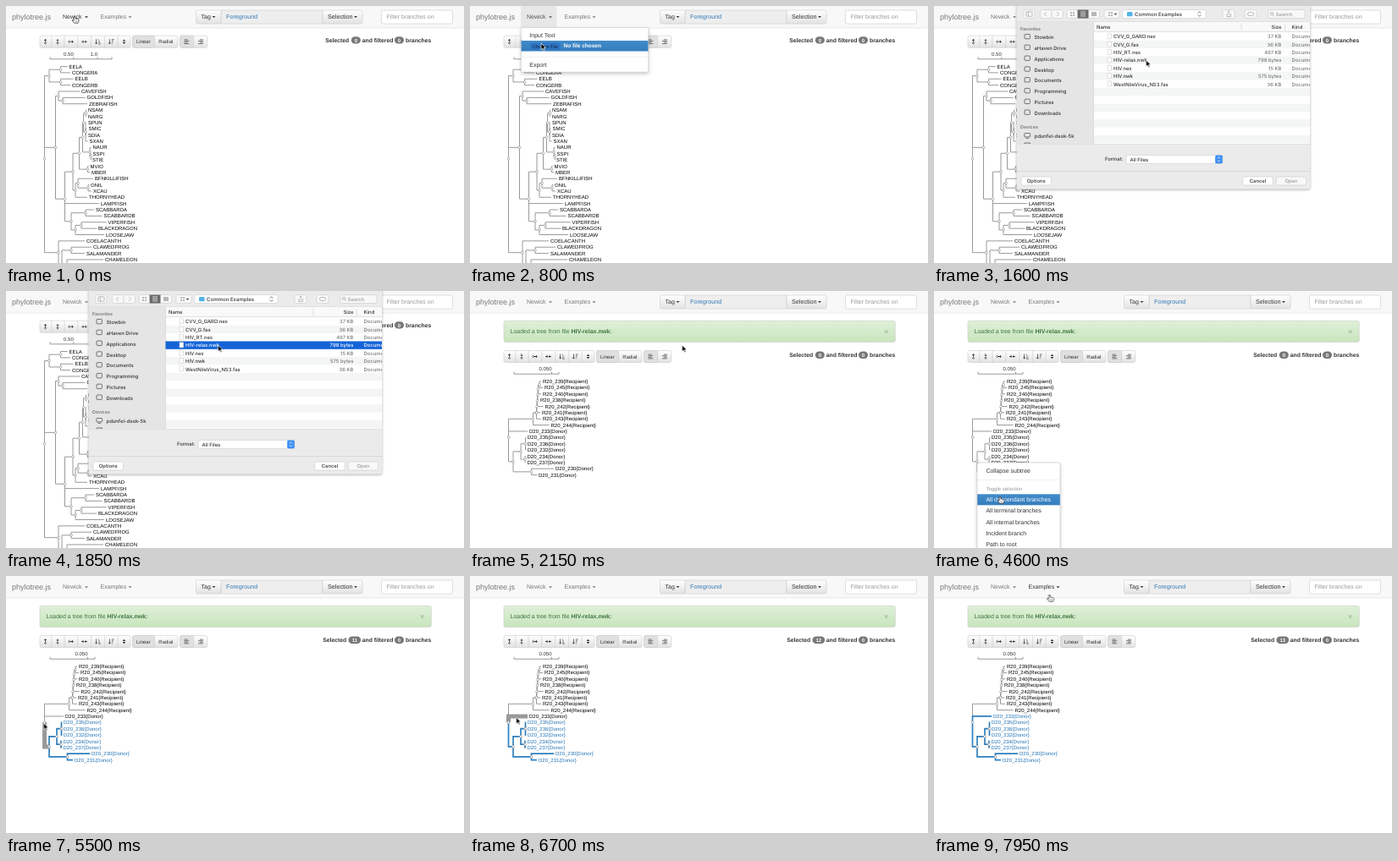
Recreate the animation shown at these times as an HTML page. Size 541 by 304 pixels, loop 8 s.

```html
<!DOCTYPE html>
<html lang="en">
<head>
<meta charset="utf-8">
<title>Tree viewer</title>
<style>
html, body { margin: 0; width: 100%; height: 100%; overflow: hidden; background: #fff; }
svg { display: block; width: 541px; height: 304px; font: 7px "Liberation Sans", Arial, sans-serif; text-rendering: geometricPrecision; fill: #333; }
text { white-space: pre; }
.branch { fill: none; stroke: #999; }
.picked .branch { stroke: #2f7fbd; stroke-width: 1.7; }
.hover .branch { stroke-width: 5; }
.leaf { font-size: 6px; fill: #000; }
.picked .leaf { fill: #2272b4; }
.node { fill: #fff; stroke: #999; stroke-width: .7; }
.small { font-size: 6px; }
.bold { font-weight: bold; }
.count { font-size: 6.8px; font-weight: bold; }
.grey { fill: #777; }
.pale { fill: #999; }
.white { fill: #fff; }
.box { stroke: #ccc; stroke-width: .6; }
.rule { stroke: #e5e5e5; stroke-width: .6; }
.line { fill: none; stroke: #555; stroke-width: .8; }
.faint { fill: none; stroke: #aaa; stroke-width: .8; }
.popup { fill: #fff; stroke: #bbb; stroke-width: .5; filter: drop-shadow(0 2px 2px rgba(0,0,0,.2)); }
.sheet { font: 500 5.9px Inter, "Open Sans", sans-serif; animation: unfold 8s linear infinite; }
.panel { filter: drop-shadow(0 1px 1.5px rgba(0,0,0,.3)); }
.tools { animation: lower 8s step-end infinite; }
.cursor { animation: point 8s ease-in-out infinite; }
@keyframes lower { 0% { transform: none; } 25%, 100% { transform: translateY(35.3px); } }
@keyframes unfold { 0%, 10.1% { transform: translateY(-225px); } 10.6%, 100% { transform: none; } }
@keyframes point {
  0%, 3% { transform: translate(81px, 12px); }
  8.75%, 12% { transform: translate(84px, 44px); }
  18.75%, 32.5% { transform: translate(250.5px, 64px); }
  41.5%, 50% { transform: translate(50px, 201px); }
  56%, 62% { transform: translate(78px, 243px); }
  67.5%, 81% { transform: translate(44.5px, 174px); }
  85%, 89.5% { transform: translate(57px, 165.5px); }
  99%, 100% { transform: translate(136.5px, 22px); }
}
</style>
</head>
<body>
<svg id="stage" viewBox="0 0 541 304">
  <defs>
    <linearGradient id="button" x2="0" y2="1"><stop stop-color="#fff"/><stop offset="1" stop-color="#e2e2e2"/></linearGradient>
    <linearGradient id="success" x2="0" y2="1"><stop stop-color="#dff0d8"/><stop offset="1" stop-color="#c8e5bc"/></linearGradient>
    <linearGradient id="active" x2="0" y2="1"><stop stop-color="#428bca"/><stop offset="1" stop-color="#357ebd"/></linearGradient>
    <clipPath id="list"><path d="M98 0H444V163H98Z"/></clipPath>
  </defs>
</svg>
<script>
const LOOP = 8000, LOADED = 2000, CLADE = 4750, STEM = 6200, TIP = 7000;
const rules = [];

// Markup shown only from one moment to another.
function during(from, to, markup, cls = '') {
  const name = 'span' + rules.length, at = t => t / LOOP * 100 + '%';
  rules.push(`@keyframes ${name} {
    0% { visibility: ${from ? 'hidden' : 'visible'}; }
    ${at(from)} { visibility: visible; }
    ${at(to)}, 100% { visibility: hidden; } }`);
  return `<g class="${cls}" style="animation: ${name} 8s step-end infinite">${markup}</g>`;
}
// A sheet needs its own transform animation next to the visibility one.
const group = (markup, cls = '', more = '') => `<g class="${cls}" ${more}>${markup}</g>`;
const text = (x, y, s, cls = '', more = '') => `<text x="${x}" y="${y}" class="${cls}" ${more}>${s}</text>`;
const rect = (x, y, w, h, fill, r = 0, cls = '') =>
  `<rect x="${x}" y="${y}" width="${w}" height="${h}" rx="${r}" fill="${fill}" class="${cls}"/>`;
const path = (d, cls = '', more = '') => `<path d="${d}" class="${cls}" ${more}/>`;
const caret = (x, y, fill = '#777') => path(`M${x} ${y}h4l-2 2.1z`, '', `fill="${fill}"`);
const END = 'text-anchor="end"', MID = 'text-anchor="middle"';

// Trees: [x, ...children] for a node, "NAME:x" for a leaf.
function layout(tree, top) {
  let row = 0;
  const place = item => {
    if (typeof item === 'string') {
      const [name, x] = item.split(':');
      return { name, x: x - 2, y: top + 7.37 * row++, kids: [] };
    }
    const kids = item.slice(1).map(place);
    return { x: item[0], y: kids.reduce((sum, k) => sum + k.y, 0) / kids.length, kids };
  };
  return place(tree);
}
const edge = (p, n) => path(`M${p.x} ${p.y}V${n.y}H${n.x}`, 'branch');
const branch = (p, n) => edge(p, n) + (n.name ? text(n.x + 2, n.y + 2.1, n.name, 'leaf') : '');
const subtree = n => n.kids.map(k => branch(n, k) + subtree(k)).join('');
const dots = n => n.kids.length
  ? `<circle cx="${n.x}" cy="${n.y}" r="1.4" class="node"/>` + n.kids.map(dots).join('') : '';
const pickedAt = (t, markup) => during(LOADED, t, markup) + during(t, LOOP, markup, 'picked');

const fishes = layout([45.5,
  [51, [64.5, 'EELA:74.5', 'CONGERA:78'], [64.5, 'EELB:81.5', 'CONGERB:78']],
  [58.5,
    [62, 'CAVEFISH:89', [67, 'GOLDFISH:95.5', 'ZEBRAFISH:98']],
    [69.5,
      [79,
        [86.5,
          [90.5,
            [91.5, [94.5, 'NSAM:97', 'NARG:97'],
              [94, 'SPUN:97', 'SMIC:97.5', 'SDIA:97', 'SXAN:98.5']],
            [99, 'NAUR:102.5', [100.3, 'SSPI:102.5', 'STIE:102']]],
          [96.5, 'MVIO:99.5', 'MBER:101']],
        [82, [85, 'BFNKILLIFISH:105', [97, 'ONIL:100', 'XCAU:103']], 'THORNYHEAD:98']],
      'LAMPFISH:112',
      [77, [94, 'SCABBARDA:106', 'SCABBARDB:115.5'],
        [82, [89, 'VIPERFISH:120.5', 'BLACKDRAGON:109'], 'LOOSEJAW:118']]]],
  [62, 'COELACANTH:95',
    [66, [77, 'CLAWEDFROG:103', 'SALAMANDER:95'],
      [72, 'CHAMELEON:117', [80, ...Array(11).fill(':90')]]]]], 71.5);

const virus = layout([45.5,
  [74.5,
    [78, [78.5, [79, [79.5, [80, [80.5, [82, 'R20_239{Recipient}:86', 'R20_245{Recipient}:88'],
      'R20_240{Recipient}:86'], 'R20_238{Recipient}:83'], 'R20_242{Recipient}:88.5'],
      'R20_241{Recipient}:85'], 'R20_243{Recipient}:86']],
    'R20_244{Recipient}:95.5'],
  'D20_233{Donor}:70',
  [51,
    [60, [65.5, 'D20_235{Donor}:68', 'D20_236{Donor}:68', 'D20_232{Donor}:68'],
      [65, 'D20_234{Donor}:67.5', 'D20_237{Donor}:67.5']],
    [72.5, 'D20_230{Donor}:101', 'D20_231{Donor}:81']]], 107);

function axis(y, right, ticks) {
  const marks = ticks.map(([x]) => `M${x} ${y}v-2.5`).join('');
  return path(`M52 ${y - 2.5}V${y}H${right}v-2.5${marks}`, 'branch') +
    ticks.map(([x, s]) => text(x, y - 3.8, s, 'small', END)).join('');
}

function virusView() {
  const [recipients, tip, stem] = virus.kids;
  const hover = (p, n, from, click, to) =>
    during(from, click, edge(p, n), 'hover') + during(click, to, edge(p, n), 'picked hover');
  return during(LOADED, LOOP,
      rect(40, 35.2, 462.3, 25.2, 'url(#success)', 2, 'box') +
      text(47.5, 50.2, 'Loaded a tree from file <tspan class="bold">HIV-relax.nwk:</tspan>', '', 'fill="#3c763d"') +
      text(489, 50.6, '×', 'bold', 'font-size="9" fill="#a6c19d"') +
      axis(98.2, 105, [[96.5, '0.050']]) + branch(virus, recipients) + subtree(recipients)) +
    pickedAt(CLADE, subtree(stem)) +
    pickedAt(TIP, branch(virus, tip)) +
    pickedAt(STEM, branch(virus, stem)) +
    hover(virus, stem, 5380, STEM, 6560) +
    hover(virus, tip, 6680, TIP, 7260) +
    during(LOADED, LOOP, dots(virus));
}

function navbar() {
  const item = (x, s, cx, fill) => text(x, 15.4, s, '', `fill="${fill}"`) + caret(cx, 12.2, fill);
  const newick = fill => item(67, 'Newick', 93, fill), examples = fill => item(111.5, 'Examples', 144.5, fill);
  return rect(0, 0, 541, 26, '#f8f8f8') + path('M0 26H541', '', 'stroke="#e3e3e3" stroke-width=".8"') +
    text(7, 16, 'phylotree.js', 'grey', 'font-size="9"') +
    during(0, 200, newick('#333')) +
    during(200, 880, rect(60, 0, 42.3, 25.6, '#e7e7e7') + newick('#555')) +
    during(880, LOOP, newick('#777')) +
    during(0, 7800, examples('#777')) + during(7800, LOOP, examples('#333')) +
    rect(254, 5, 120, 16, '#eee', 0, 'box') + text(260, 15.1, 'Foreground', '', 'font-size="7.2" fill="#337ab7"') +
    rect(224.5, 5, 29.5, 16, 'url(#button)', 2, 'box') + text(230.5, 15.1, 'Tag') + caret(243.5, 12, '#333') +
    rect(374, 5, 47, 16, 'url(#button)', 2, 'box') + text(380, 15.1, 'Selection', '', 'font-size="7.2"') + caret(411, 12, '#333') +
    rect(443.5, 5, 84, 16, '#fff', 2, 'box') + text(449.5, 15.2, 'Filter branches on', 'pale');
}

function toolbar() {
  const up = 'M-1.8-1.4L0-3.3 1.8-1.4z', down = 'M-1.8 1.4L0 3.3 1.8 1.4z';
  const apart = path('M-.4-2.5H.4V2.5H-.4z' + up + down);
  const together = path('M-.4-3.3H.4V-1.8H1.7L0-.2-1.7-1.8H-.4zM-.4 3.3H.4V1.8H1.7L0 .2-1.7 1.8H-.4z');
  const turned = m => group(m, '', 'transform="rotate(90)"');
  const sort = flip => path('M-2.2-3H-1.5V1.3H-.3L-1.85 3-3.4 1.3H-2.2z') +
    path([0, 1, 2, 3].map(i => `M.6 ${-2.6 + i * 1.75}h${(flip ? 3 - i : i) * .65 + .8}`).join(''), 'line');
  const icons = [apart, together, turned(apart), turned(together), sort(false), sort(true),
    path('M-1.9-.6L0-2.8 1.9-.6zM-1.9.6L0 2.8 1.9.6z')];
  const bars = right => path([0, 1, 2, 3].map(i =>
    `M${right ? 3 : -3} ${-2.4 + i * 1.6}h${(right ? -1 : 1) * (i % 2 ? 5.8 : 4)}`).join(''), 'line');
  const at = (x, m) => group(m, '', `transform="translate(${x} 42.2)"`);
  const badge = (x, n) => rect(x, 36.2, n > 9 ? 14.6 : 11, 8.4, '#777', 4.2) +
    text(x + (n > 9 ? 7.3 : 5.5), 42.6, n, 'bold small white', MID);
  const selected = n => text(n ? 374.2 : 377.3, 42.6, 'Selected', 'count') + badge(n ? 404.5 : 407.8, n);
  return rect(40, 35.2, 107, 14, 'url(#button)', 2, 'box') +
    path([53.8, 69, 84.7, 100.6, 116.4, 132].map(x => `M${x} 35.2v14`).join(''), 'box') +
    icons.map((icon, i) => at([46.5, 61, 76.5, 92.5, 108.5, 124.2, 139.5][i], icon)).join('') +
    rect(149.5, 35.2, 53.5, 14, 'url(#button)', 2, 'box') + rect(149.5, 35.2, 26, 14, '#e0e0e0', 2, 'box') +
    text(154, 44.4, 'Linear', 'small') + text(180.3, 44.4, 'Radial', 'small') +
    rect(205.5, 35.2, 32.3, 14, 'url(#button)', 2, 'box') + rect(205.5, 35.2, 16.2, 14, '#e0e0e0', 2, 'box') +
    at(213.5, bars(false)) + at(229.8, bars(true)) +
    during(0, CLADE, selected(0)) + during(CLADE, STEM, selected(11)) +
    during(STEM, TIP, selected(12)) + during(TIP, LOOP, selected(13)) +
    text(420.8, 42.6, 'and filtered', 'count') + badge(459, 0) + text(502.3, 42.6, 'branches', 'count', END);
}

function newickMenu() {
  const chooser = fill => rect(71, 43.6, 35.5, 8, fill, 1.5) + text(74, 49.8, 'Choose File', '', 'font-size="5.6" fill="#0d2740"');
  const status = cls => text(110.5, 48.8, 'No file chosen', cls);
  return during(200, 880, rect(60.3, 25.6, 150.5, 52.6, '#fff', 1, 'popup') +
      text(70.3, 37, 'Input Text') + text(70.3, 72, 'Export') + path('M60.5 60.3H210.5', 'rule')) +
    during(200, 600, chooser('#eee') + status('')) +
    during(600, 880, rect(60.5, 41, 150, 12.5, 'url(#active)') + chooser('#2f74c4') +
      group(status('white bold'), '', 'font-size="6.5"'));
}

function nodeMenu() {
  const x = 51, y = 203, left = x + 10.4;
  const option = (s, dy) => text(left, y + dy, s);
  return during(3900, CLADE, rect(x, y, 98, 150, '#fff', 2, 'popup') +
      option('Collapse subtree', 12) + path(`M${x} ${y + 20.3}h98`, 'rule') +
      text(left, y + 33, 'Toggle selection', 'small pale') + option('All descendant branches', 46) +
      ['All terminal branches', 'All internal branches', 'Incident branch', 'Path to root']
        .map((s, i) => option(s, 59.3 + i * 13.3)).join('')) +
    during(4420, CLADE, rect(x + .2, y + 37.3, 97.6, 13, 'url(#active)') + text(left, y + 46, 'All descendant branches', 'white'));
}

function fileSheet() {
  const files = [['CVV_G_GARD.nex', '37 KB'], ['CVV_G.fas', '36 KB'], ['HIV_RT.nex', '497 KB'],
    ['HIV-relax.nwk', '798 bytes'], ['HIV.nex', '15 KB'], ['HIV.nwk', '575 bytes'], ['WestNileVirus_NS3.fas', '36 KB']];
  const places = ['Stowbin', 'aHaven Drive', 'Applications', 'Desktop', 'Documents', 'Programming', 'Pictures', 'Downloads'];
  const rowY = i => 31.4 + i * 9.35;
  const entry = ([name, size], i, cls = '', dim = 'grey') => {
    const y = rowY(i) + 7;
    return rect(205, y - 5.6, 4.6, 6, '#fff', 0, 'box') + text(212, y, name, cls) +
      text(410.5, y, size, dim, END) + text(422.5, y, 'Document', dim);
  };
  const place = (s, i) => rect(107, 33.4 + i * 12.8, 6.4, 5.4, 'none', 1, 'line') + text(118.5, 39.2 + i * 12.8, s);
  const button = (x, y, w, h) => rect(x, y, w, h, '#f8f8f8', 2, 'box');
  const white = (x, y, w, h) => rect(x, y, w, h, '#fff', 2, 'box');
  const chevrons = (x, y) => path(`M${x - 1.7} ${y - 1}l1.7-1.8 1.7 1.8m0 2l-1.7 1.8-1.7-1.8`, 'line');
  const toolbarIcons =
    rect(109, 6.8, 7, 5.4, 'none', .5, 'faint') +
    path('M111.3 7v5M132.8 7l-2.5 2.5 2.5 2.5M145.2 7l2.5 2.5-2.5 2.5', 'faint') +
    path('M161 8h2m1 0h2m-5 3h2m1 0h2M187 7v5m2-5v5m2-5v5M206 8h2m1 0h2m-5 3h2m1 0h2', 'line') +
    path('M173 7h6m-6 2.4h6m-6 2.4h6', '', 'stroke="#fff" stroke-width=".8"') + caret(212.5, 8.8, '#555') +
    path('M346 9v3.5h4.5V9M348.2 11V6M346.8 7.2l1.4-1.4 1.4 1.4', 'faint') +
    rect(370.5, 7.5, 7, 4, 'none', 2, 'faint') +
    '<circle cx="399" cy="9" r="1.7" class="faint"/>' + path('M400.3 10.3l1.5 1.5', 'faint') +
    text(403.5, 11.7, 'Search', 'pale');
  const heading = (y, s) => text(102, y, s, 'grey', 'font-size="5.4" font-weight="600"');
  const stripes = [1, 3, 5, 7, 9, 11, 13].map(i => rect(188.5, rowY(i), 255.5, 9.35, '#f4f5f5')).join('');
  const list = rect(98, 19, 90.5, 144, '#e5e5e5') + rect(188.5, 19, 255.5, 144, '#fff') + stripes +
    rect(188.5, 19, 255.5, 11.4, '#f9f9f9') + path('M188.5 19V163M188.5 30.4H444M414.5 21v8M363 21v8', 'box') +
    text(192, 27, 'Name') + text(410.5, 27, 'Size', '', END) + text(422.5, 27, 'Kind') +
    heading(28.7, 'Favorites') + places.map(place).join('') + heading(144.5, 'Devices') +
    rect(106.8, 150.5, 6.8, 4.4, 'none', .8, 'line') + path('M108.5 156.4h3.4M107 162h6.5v3h-6.5z', 'line') +
    text(118.5, 155.5, 'pdunfel-desk-5k') + files.map((f, i) => entry(f, i)).join('') +
    during(1750, 1920, rect(188.5, rowY(3), 255.5, 9.35, '#1464d8') + entry(files[3], 3, 'white', 'white'));
  return during(810, 1920, group(rect(97.6, -6, 346.6, 222.6, '#ebebeb', 2, 'panel') +
    path('M97.6 19H444.2M97.6 163H444.2M97.6 195.5H444.2', 'box') +
    button(106, 4.5, 13, 10) + button(125.5, 4.5, 13.5, 10) + button(139, 4.5, 13.5, 10) +
    button(157, 4.5, 38.5, 10) + rect(169.5, 4.5, 13, 10, '#6b6b6b') +
    button(201, 4.5, 18, 10) + white(222.5, 4.5, 98.5, 10) + button(341, 4.5, 14, 10) + button(367, 4.5, 14, 10) +
    button(395, 4.5, 43, 10) + rect(228, 7, 6.5, 5.2, '#55b4e6', .8) +
    text(237, 11.8, 'Common Examples', '', 'font-size="6.1"') + chevrons(313.5, 9.5) + toolbarIcons +
    group(list, '', 'clip-path="url(#list)"') +
    text(223.5, 183.3, 'Format:', '', END) + white(227, 176.4, 114, 10) + text(231.5, 183.5, 'All Files') +
    rect(332.2, 176.6, 8.6, 9.6, '#3b8df2', 1.5) + group(chevrons(336.5, 181.4), '', 'style="filter: brightness(4)"') +
    white(103, 202, 35.5, 10) + text(120.7, 209.2, 'Options', '', MID) +
    white(364.8, 202, 35.5, 10) + text(382.5, 209.2, 'Cancel', '', MID) +
    button(404.2, 202, 35.5, 10) + text(422, 209.2, 'Open', 'pale', MID), 'sheet'));
}

function cursor() {
  const outline = 'stroke="#fff" stroke-width=".7" stroke-linejoin="round" fill="#000"';
  const arrow = path('M0 0V7.6L1.8 6 3 8.8 4.4 8.2 3.2 5.5H5.6z', '', outline);
  const hand = path('M-.9.8Q0-.5.9.8V3.2Q1.8 2.6 2.5 3.4 3.4 3 4 3.8 5 3.7 5 4.8 5 6.6 4 8.2H-.4Q-1.6 6.6-3 4.9-2.6 3.8-.9 5.2z', '',
    'fill="#fff" stroke="#222" stroke-width=".7"') + path('M1 5.2v1.8m1.3-1.8v1.8', '', 'stroke="#222" stroke-width=".4"');
  return group(during(0, 420, hand) + during(420, 4150, arrow) + during(4150, 4960, hand) +
    during(4960, 7800, arrow) + during(7800, LOOP, hand), 'cursor');
}

const markup =
  during(0, LOADED, axis(62.8, 125, [[79.8, '0.50'], [108, '1.0']]) + subtree(fishes) + dots(fishes)) +
  virusView() + group(toolbar(), 'tools') + navbar() + newickMenu() + nodeMenu() + fileSheet() + cursor();

const style = document.createElement('style');
style.textContent = rules.join('\n');
document.head.append(style);
document.getElementById('stage').insertAdjacentHTML('beforeend', markup);
</script>
</body>
</html>
```
